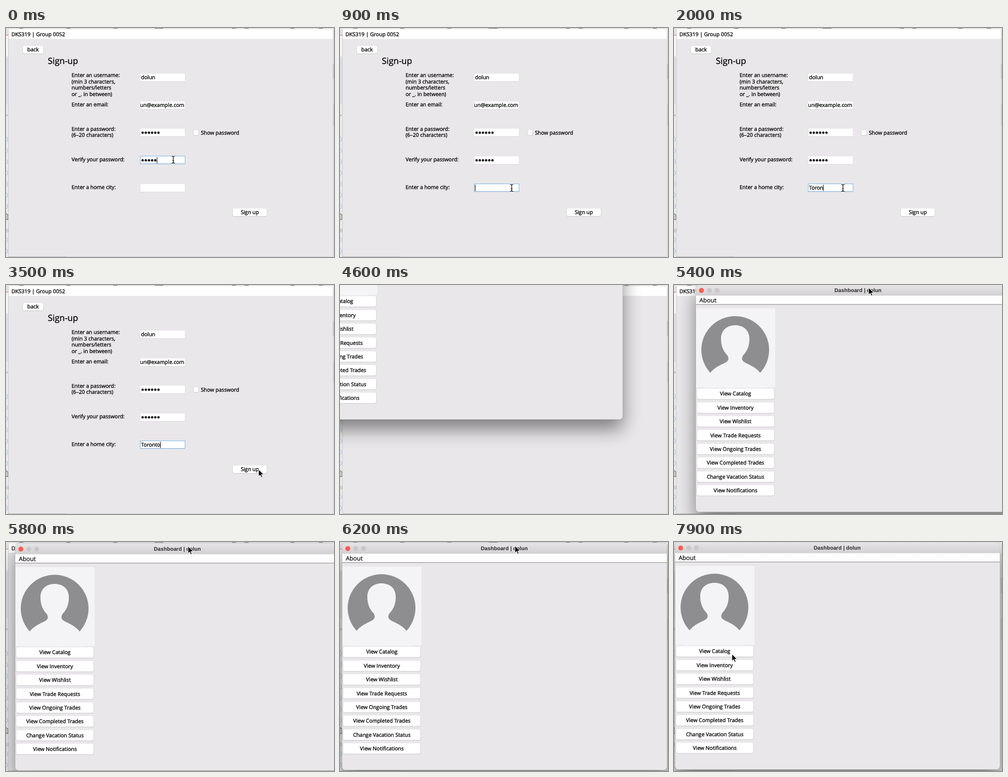
An HTML page that plays this animation: 600x421 px, repeating every 8000 ms.

```html
<!DOCTYPE html>
<html lang="en">
<head>
<meta charset="utf-8">
<title>Sign-up and dashboard</title>
<style>
  html, body { margin: 0; width: 100%; height: 100%; overflow: hidden; background: #e9e7e9; }
  svg { display: block; width: 100vw; height: 100vh; }
  text { font: 500 9.65px "Open Sans", "Noto Sans", sans-serif; fill: #050505; stroke: #050505; stroke-width: 0.32px; white-space: pre; text-rendering: geometricPrecision; }
  .mid { text-anchor: middle; }
  .head { font-size: 15.8px; }
  .menu { font-size: 11.1px; stroke-width: 0.2px; }
  .bar { font: bold 9.8px "Liberation Sans", Arial, sans-serif; fill: #2b2b2b; stroke: none; text-anchor: middle; }
  .shade { filter: blur(17px); }
</style>
</head>
<body>
<svg id="stage" viewBox="0 0 600 421" preserveAspectRatio="none">
  <defs>
    <linearGradient id="titleFill" x1="0" y1="0" x2="0" y2="1">
      <stop offset="0" stop-color="#e7e5e7"/><stop offset="1" stop-color="#d1cfd1"/>
    </linearGradient>
    <clipPath id="mailClip"><rect x="246" y="135" width="81" height="14"/></clipPath>
  </defs>
</svg>
<script>
const LOOP = 8000, STEP = 100;
const USER = "dolun", CITY = "Toronto";
const BODY = "#e9e7e9";
const stage = document.getElementById("stage");

function add(parent, tag, attrs, content) {
  const el = document.createElementNS("http://www.w3.org/2000/svg", tag);
  for (const k in attrs) el.setAttribute(k, attrs[k]);
  if (content !== undefined) el.textContent = content;
  parent.appendChild(el);
  return el;
}
const group = (parent) => add(parent, "g", {});
const rect = (p, x, y, width, height, fill, rx = 0) => add(p, "rect", { x, y, width, height, fill, rx });
const label = (p, x, y, str, cls = "") => add(p, "text", { x, y, class: cls }, str);
const dot = (p, cx, cy, r, fill) => add(p, "circle", { cx, cy, r, fill });
const path = (p, d, fill, stroke = "none", w = 1) =>
  add(p, "path", { d, fill, stroke, "stroke-width": w, "stroke-linejoin": "round" });
const show = (el, on) => el.setAttribute("visibility", on ? "visible" : "hidden");

function button(p, x, y, w, h, str) {
  rect(p, x - 0.5, y, w + 1, h + 1, "#cbc9cb", 3.5);
  rect(p, x, y, w, h, "#fff", 3);
  label(p, x + w / 2, y + h / 2 + 3.4, str, "mid");
}

// Desktop slivers around the windows
function desktop(p) {
  rect(p, 0, 0, 600, 421, "#e4e2e5");
  rect(p, 0, 14, 5, 38, "#f6f4f6");
  rect(p, 0, 12.5, 5, 1.3, "#e58b7c");
  rect(p, 0, 54, 5, 86, "#dfdde5");
  rect(p, 0, 141, 5, 280, "#e9e8ed");
  for (let i = 0; i < 11; i++) {
    if (i === 7 || i === 8) continue;
    path(p, `M0 ${200 + i * 20.5}q4 3 3 6t-3 3`, "none", "#9dbdea");
  }
  path(p, "M0 341l4 3v8h-4", "#c9c9c9", "#555");
  rect(p, 0, 159, 3, 3, "#c2c0c4");
  rect(p, 0, 369, 1, 7, "#aaa");
  rect(p, 3, 369, 1, 7, "#aaa");
  for (const x of [24, 110, 196, 272, 280, 413, 436, 520, 572]) rect(p, x, 0, 8, 1.3, "#8b898c", 1);
  rect(p, 598, 66, 2, 28, "#c3c1c4");
  rect(p, 598, 140, 2, 40, "#cfcdd0");
  rect(p, 4, 3, 1, 417, "#cfcdd0");
  rect(p, 597.5, 3, 1, 417, "#c4c2c5");
  rect(p, 4, 419.5, 107, 1.5, "#bab8bb");
  rect(p, 111, 419.5, 487, 1.5, "#d2d0d3");
}

const fieldTops = [84, 135, 185, 236, 287];
const overField = (x, y) => x > 245 && x < 328 && fieldTops.some((f) => y >= f && y <= f + 14);

function dots(p, y) {
  return [0, 1, 2, 3, 4, 5].map((i) => dot(p, 249.9 + i * 5.8, y, 2.2, "#111"));
}
const focusRing = (p, y) =>
  add(p, "rect", { x: 245.5, y: y - 0.5, width: 82, height: 14, fill: "none", stroke: "#86bbe8" });

desktop(stage);
rect(stage, 5, 2, 593, 418, BODY);
rect(stage, 5, 2, 593, 18, "#fff");
label(stage, 10, 14.5, "DKS319 | Group 0052");

// Sign-up form
const form = group(stage);
button(form, 31, 33, 37, 14, "back");
label(form, 76.5, 66.3, "Sign-up", "head");
[
  [90, "Enter an username:"], [101.5, "(min 3 characters,"], [113, "numbers/letters"], [124.5, "or _. in between)"],
  [144, "Enter an email:"], [188.5, "Enter a password:"], [200, "(6\u201320 characters)"],
  [245, "Verify your password:"], [296, "Enter a home city:"]
].forEach(([y, str]) => label(form, 120, y, str));
for (const y of fieldTops) {
  rect(form, 245, y, 83, 14.5, "#cfcdcf");
  rect(form, 245.5, y, 82, 14, "#fff");
}
label(form, 247, 94.3, USER);
const mail = group(form);
mail.setAttribute("clip-path", "url(#mailClip)");
add(mail, "text", { x: 326, y: 145, "text-anchor": "end" }, USER + "@example.com");
dots(form, 192.5);
const verifyDots = dots(form, 243.3);
rect(form, 342.5, 187.3, 10, 10.4, "#c3c1c3", 2.5);
rect(form, 343, 187.5, 9, 9.5, "#fff", 2);
label(form, 356.5, 195.7, "Show password");
button(form, 415, 331.5, 62, 14.5, "Sign up");
const city = label(form, 247, 297.2, "");
const rings = [focusRing(form, 236), focusRing(form, 287)];
const caret = rect(form, 0, 0, 1, 11.5, "#111");

// Dashboard window, drawn at its resting place
const dash = group(stage);
add(dash, "rect", { x: 2, y: 18, width: 594, height: 418, rx: 6, fill: "#000", opacity: 0.46, class: "shade" });
rect(dash, 1.5, 0, 595, 418.5, "#aaa8aa", 6.5);
rect(dash, 2, 0.5, 594, 417.5, BODY, 6);
path(dash, "M2 21V6.5a6 6 0 0 1 6-6H590a6 6 0 0 1 6 6V21Z", "url(#titleFill)");
rect(dash, 2, 20.5, 594, 16, "#fdfdfd");
rect(dash, 2, 36.3, 594, 1, "#8d8b8d");
["#fb5a52", "#c9c7c9", "#c9c7c9"].forEach((c, i) => dot(dash, 12.2 + i * 14.4, 11, 4.5, c));
label(dash, 298.5, 14, "Dashboard | " + USER, "bar");
label(dash, 8.5, 33, "About", "menu");
rect(dash, 3, 44, 144, 145, "#f4f3f5");
dot(dash, 74, 120.3, 62, "#8e8d8f");
path(dash, "M18 190L27 164.5C34 153 48 148 57 143C62 140 63 136 59.5 130C52 123 48 112 48 100C48 84 59 75 74 75" +
  "S100 84 100 100C100 112 96 123 88.5 130C85 136 86 140 91 143C100 148 114 153 121 164.5L130 190Z", "#f4f3f5");
["View Catalog", "View Inventory", "View Wishlist", "View Trade Requests", "View Ongoing Trades",
  "View Completed Trades", "Change Vacation Status", "View Notifications"
].forEach((str, i) => button(dash, 4, 191.3 + i * 25.35, 141, 19.5, str));

// Pointers
const beam = group(stage);
const beamShape = "M-3-6.5Q0-6.5 0-4.5Q0-6.5 3-6.5M0-4.5V4.5M-3 6.5Q0 6.5 0 4.5Q0 6.5 3 6.5M-1.5 1.5H1.5";
path(beam, beamShape, "none", "#fff", 2.6);
path(beam, beamShape, "none", "#111", 1.2);
const arrow = group(stage);
path(arrow, "M0 0V13L3 10.2L5.2 15L7.2 14.1L5.1 9.4H9.3Z", "#000", "#fff", 0.9);

// Motion tables: time, x, y
const moves = [
  [0, 306, 242], [900, 314, 294], [1000, 316, 294], [1100, 313, 294], [1900, 313, 294], [2000, 309, 294],
  [2100, 317, 295], [2600, 317, 295], [3500, 462, 339], [4400, 462, 339], [4500, 410, 239],
  [6400, 318, 6], [6900, 318, 6], [7600, 122, 359], [7700, 122, 359], [7800, 117, 268], [7900, 106, 206]
];
const drag = [[4900, -79, -171], [5400, 38, -1], [5800, 15, 2], [6200, 2, 1], [6400, 0, 0]];
const keyTimes = [1300, 1500, 1700, 1800, 2000, 2100, 2300];
const opening = { 3600: [0.4, 0.92], 3700: [0.8, 0.98] };

const linear = (u) => u;
const smooth = (u) => u * u * (3 - 2 * u);
function along(keys, t, ease) {
  const n = keys.findIndex((k) => k[0] >= t);
  if (n === 0) return keys[0].slice(1);
  if (n < 0) return keys[keys.length - 1].slice(1);
  const [a, b] = [keys[n - 1], keys[n]];
  const u = ease((t - a[0]) / (b[0] - a[0]));
  return [1, 2].map((i) => Math.round(a[i] + (b[i] - a[i]) * u));
}

function draw(t) {
  const inCity = t >= 900;
  verifyDots[5].setAttribute("opacity", t >= 100 ? 1 : 0);
  city.textContent = CITY.slice(0, keyTimes.filter((k) => k <= t).length);
  show(rings[0], !inCity);
  show(rings[1], inCity);
  const end = inCity ? city.getComputedTextLength() : 5.8 * (t >= 100 ? 6 : 5);
  caret.setAttribute("x", 246.8 + end);
  caret.setAttribute("y", inCity ? 288.2 : 237.4);
  form.setAttribute("display", t < 3600 ? "inline" : "none");

  const [dx, dy] = along(drag, t, linear);
  const [alpha, size] = opening[t] || [1, 1];
  dash.setAttribute("display", t < 3600 ? "none" : "inline");
  dash.setAttribute("opacity", alpha);
  dash.setAttribute("transform",
    `translate(${dx + 299 * (1 - size)} ${dy + 209 * (1 - size)}) scale(${size})`);

  const held = t >= 4600 && t <= 6400;
  const [x, y] = held ? [318 + dx, 6 + dy] : along(moves, t, smooth);
  const typing = t < 3600 && overField(x, y);
  show(beam, typing);
  show(arrow, !typing);
  (typing ? beam : arrow).setAttribute("transform", `translate(${x} ${y})`);
}

let last = -1;
function tick() {
  const t = Math.floor((performance.now() % LOOP) / STEP) * STEP;
  if (t !== last) draw(last = t);
  requestAnimationFrame(tick);
}
tick();
</script>
</body>
</html>
```
